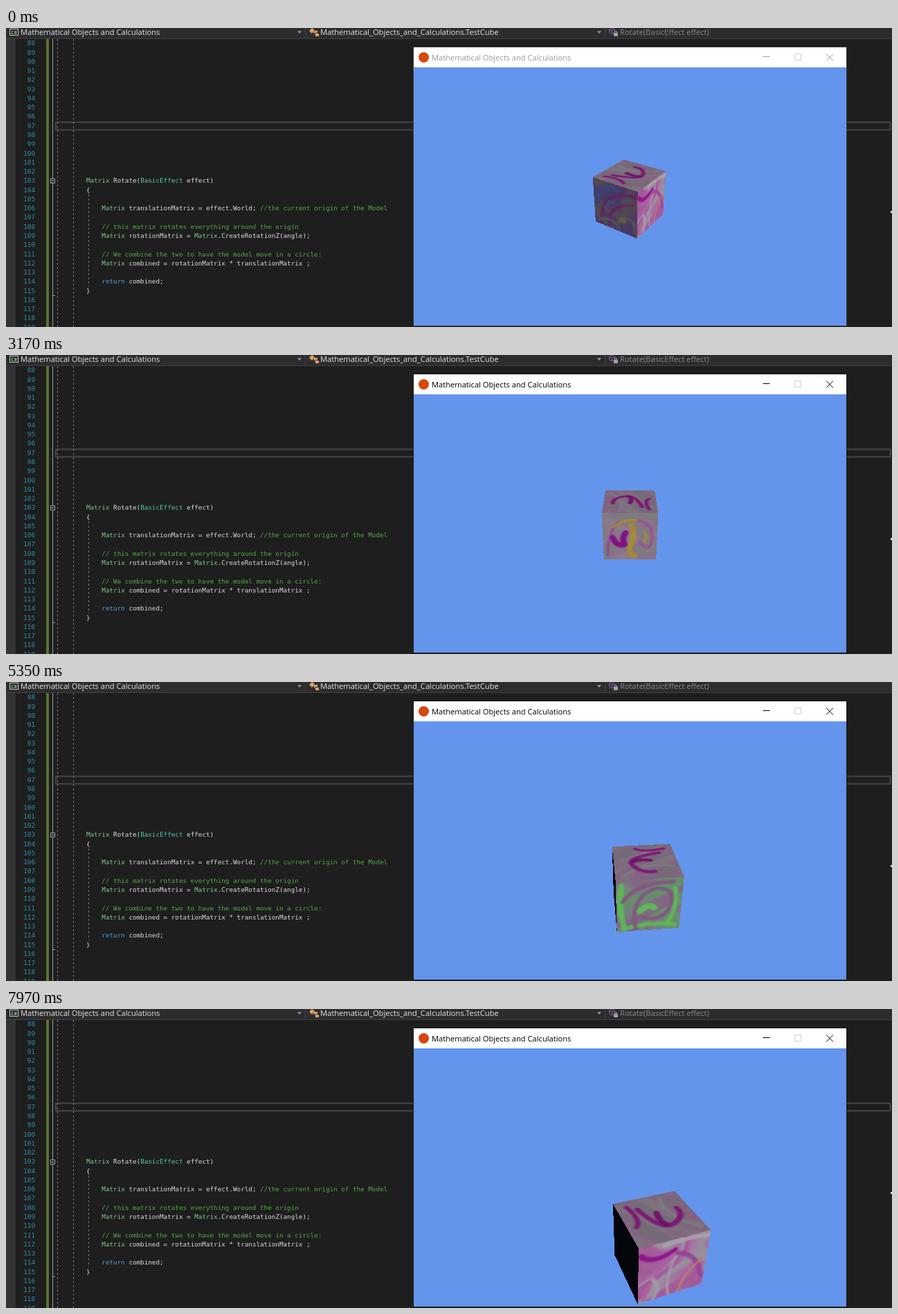
Animation of 1280 by 433 pixels, one loop 8000 ms. Source, as an HTML page with a canvas:

```html
<!DOCTYPE html>
<html lang="en">
<head>
<meta charset="utf-8">
<title>Rotating cube</title>
<style>
  html, body { margin: 0; width: 100%; height: 100%; overflow: hidden; background: #1e1e1e; }
  svg, canvas { position: absolute; display: block; }
  svg { left: 0; top: 0; }
  text { white-space: pre; }
  .ui { font-family: "Open Sans", "Noto Sans", sans-serif; font-size: 11.15px; }
  .code { font-family: "DejaVu Sans Mono", "Noto Sans Mono", monospace; font-size: 9.27px; fill: #dcdcdc; }
</style>
</head>
<body>
<svg width="1280" height="433" viewBox="0 0 1280 433">
  <rect width="1280" height="433" fill="#1e1e1e"/>
  <rect y="15" width="14" height="418" fill="#333335"/>
  <rect width="1280" height="15" fill="#2d2d30"/>
  <path d="M0 15.5H1280M432.5 0V13M865.5 0V13" stroke="#3f3f46"/>

  <g class="ui" fill="#e4e4e4">
    <rect x="5.5" y="1.5" width="12" height="9" fill="#252526" stroke="#c8c8c8"/>
    <text x="7" y="9" font-size="7" font-weight="700" fill="#8cc98c">C#</text>
    <text x="21" y="10">Mathematical Objects and Calculations</text>
    <path d="M421 4.5h6l-3 3.5zM854 4.5h6l-3 3.5z" fill="#999"/>
    <path d="M438 4l4-4 4 3-4 5zM445 4h5v3h-5zM447 8h5v4h-5z" fill="#d9a066"/>
    <path d="M443 5l5 5" stroke="#d9a066"/>
    <text x="454" y="10">Mathematical_Objects_and_Calculations.TestCube</text>
    <path d="M871.5 2.5l4-2.5 4 2.5v4l-4 2.5-4-2.5zl4 2 4-2M875.5 4.5v4" fill="none" stroke="#8a5aa0"/>
    <path d="M878 7h6v5h-6z" fill="#a0a0a0"/>
    <path d="M879.5 7v-2h3v2" fill="none" stroke="#a0a0a0"/>
    <text x="887" y="10" fill="#8a8a8a">Rotate(BasicEffect effect)</text>
  </g>

  <rect x="58" y="16" width="4" height="417" fill="#577430"/>
  <rect x="72" y="136.5" width="1205.5" height="11" fill="none" stroke="#464646" stroke-width="2"/>
  <path d="M67.5 16V433M67.5 387.5H71" stroke="#a0a0a0" fill="none"/>
  <path d="M74.5 16V433M97.5 16V433M119.5 241V374" stroke="#777" stroke-dasharray="3 3"/>
  <rect x="64.5" y="218.5" width="6" height="6" fill="#1e1e1e" stroke="#a0a0a0"/>
  <path d="M66 221.5h3" stroke="#dcdcdc"/>
  <path d="M1279 265v3" stroke="#ddd" stroke-width="2"/>
  <g id="code" class="code"></g>

  <rect id="frame" x="588" y="27" width="627" height="405"/>
  <rect x="589" y="57" width="625" height="374" fill="#6495ed"/>
  <rect x="589" y="28" width="625" height="29" fill="#fff"/>
  <circle cx="603.5" cy="42.5" r="7.5" fill="#d5480c"/>
  <rect x="1139.5" y="37.5" width="9" height="9" fill="none" stroke="#d0d0d0"/>
  <g id="caption">
    <text class="ui" x="615" y="46.5">Mathematical Objects and Calculations</text>
    <path d="M1093.5 41.5h10M1185 37.5l10 10M1195 37.5l-10 10" stroke="currentColor" fill="none"/>
  </g>
</svg>
<canvas id="view" width="190" height="246" style="left:840px;top:185px"></canvas>

<script>
const LOOP = 8000;
const byId = id => document.getElementById(id);
const clamp = (x, a, b) => Math.min(b, Math.max(a, x));

// ---- code listing ----
const PITCH = 13.27, FIRST = 88, CHAR = 5.58;
const listing = {
  103: "Matrix Rotate(BasicEffect effect)",
  104: "{",
  106: "    Matrix translationMatrix = effect.World; //the current origin of the Model",
  108: "    // this matrix rotates everything around the origin",
  109: "    Matrix rotationMatrix = Matrix.CreateRotationZ(angle);",
  111: "    // We combine the two to have the model move in a circle:",
  112: "    Matrix combined = rotationMatrix * translationMatrix ;",
  114: "    return combined;",
  115: "}"
};
const inks = { Matrix: "#86c691", BasicEffect: "#4ec9b0", return: "#569cd6" };

function paint(line) {
  return line.split(/(\/\/.*|\bMatrix\b|BasicEffect|return)/).map(part => {
    const ink = part.startsWith("//") ? "#57a64a" : inks[part];
    return ink ? `<tspan fill="${ink}">${part}</tspan>` : part;
  }).join("");
}

let rows = "";
for (let n = FIRST; n < 120; n++) {
  const y = (25.3 + (n - FIRST) * PITCH).toFixed(2);
  rows += `<text x="42" y="${y}" text-anchor="end" fill="#2b91af">${n}</text>`;
  const line = listing[n];
  if (line) {
    const body = line.trimStart();
    rows += `<text x="${116 + (line.length - body.length) * CHAR}" y="${y}">${paint(body)}</text>`;
  }
}
byId("code").innerHTML = rows;

// ---- marbled faces: noise ramp plus a few soft brush strokes on a 100-unit square ----
const TEX = 128;
const rgb = hex => [1, 3, 5].map(i => parseInt(hex.slice(i, i + 2), 16));

function noise(seed, u, v) {
  let p = u * 2.2 + seed, q = v * 2.2 - seed;
  for (let i = 1; i < 4; i++) {
    p += .8 / i * Math.sin(i * 1.6 * q + seed);
    q += .8 / i * Math.sin(i * 1.4 * p);
  }
  return .5 + .5 * Math.sin(3 * p + 2 * q);
}

function marble(seed, ramp, ...strokes) {
  const [a, b, c] = ramp.split(" ").map(rgb);
  const pen = new OffscreenCanvas(TEX, TEX).getContext("2d", { willReadFrequently: true });
  const img = pen.createImageData(TEX, TEX);
  for (let i = 0; i < TEX * TEX; i++) {
    const n = 2 * noise(seed, i % TEX / TEX, Math.floor(i / TEX) / TEX);
    for (let j = 0; j < 3; j++)
      img.data[4 * i + j] = n < 1 ? a[j] + (b[j] - a[j]) * n : b[j] + (c[j] - b[j]) * (n - 1);
    img.data[4 * i + 3] = 255;
  }
  pen.putImageData(img, 0, 0);
  pen.scale(TEX / 100, TEX / 100);
  pen.lineCap = pen.lineJoin = "round";
  pen.filter = "blur(1.5px)";
  pen.globalAlpha = .9;
  for (const [ink, width, path] of strokes) {
    pen.strokeStyle = ink;
    pen.lineWidth = width;
    pen.stroke(new Path2D(path));
  }
  return pen.getImageData(0, 0, TEX, TEX).data;
}

const faces = [
  marble(1.3, "#7068b0 #98609c #8c8484",
    ["#7070c0", 16, "M8 50Q8 14 45 10"],
    ["#b03c94", 7, "M15 95Q18 20 95 12"],
    ["#b03c94", 5, "M35 95Q35 45 92 30"],
    ["#7f7fd0", 7, "M29 58Q35 38 45 40"],
    ["#98987c", 7, "M55 82Q80 50 95 75"],
    ["#98987c", 6, "M10 92Q40 70 60 95"],
    ["#b0b060", 11, "M66 72h4"]),
  marble(4.1, "#988e94 #a8609a #a0588e",
    ["#8c0c80", 8, "M3 14Q20 34 50 18"],
    ["#a8a4a4", 7, "M35 6Q70 2 98 8"],
    ["#b05a9c", 6, "M50 25Q20 50 8 95"],
    ["#a49aa2", 4, "M52 30Q38 60 45 98"],
    ["#a49aa2", 6, "M20 60Q35 80 22 98"],
    ["#943c88", 7, "M55 25Q85 35 95 80"],
    ["#b88058", 4, "M60 98Q70 60 92 50"]),
  marble(2.6, "#6a9a68 #7c857c #8a6a84",
    ["#60c850", 9, "M8 10Q2 50 12 92"],
    ["#60c850", 8, "M10 95Q50 82 92 92"],
    ["#60c850", 7, "M88 20Q95 60 80 85"],
    ["#88587e", 7, "M10 40Q30 5 85 8"],
    ["#88587e", 6, "M30 95Q20 30 60 18Q95 20 80 60Q65 85 40 72"],
    ["#62cc50", 11, "M36 60Q50 44 58 55"]),
  marble(5.7, "#8a8884 #98788e #988890",
    ["#789078", 5, "M5 8Q50 2 95 10"],
    ["#98509a", 5, "M8 90Q8 40 30 18"],
    ["#a85898", 6, "M65 15Q95 20 90 60Q85 85 70 62"],
    ["#bc9c20", 5, "M20 28Q38 12 60 14"],
    ["#bc9c20", 10, "M52 25Q62 45 50 70Q46 85 60 92"],
    ["#bc9c20", 4, "M76 38Q84 50 76 60"],
    ["#8c0488", 11, "M18 50Q25 72 40 66Q34 52 42 40"]),
  marble(3.4, "#8a8082 #926c88 #80787c",
    ["#8c888a", 6, "M10 30Q50 45 90 8"],
    ["#8a1078", 8, "M25 72Q85 60 70 35Q60 15 40 18"],
    ["#8a1078", 7, "M15 85Q50 75 62 88"],
    ["#7c0a6c", 9, "M42 50Q60 55 70 48"])
];

// ---- ray-cast cube ----
const canvas = byId("view"), ctx = canvas.getContext("2d");
const { width: W, height: H } = canvas;
const RAD = Math.PI / 180;
const FOCAL = 452.7, DIST = 12.41, TILT_S = .5, TILT_C = Math.cos(30 * RAD);
const MID_X = 901.5 - 840, MID_Y = 244.5 - 185;
const AMBIENT = [5, 5, 12];
const texel = x => clamp(Math.floor((x + 1) / 2 * TEX), 0, TEX - 1);

function drawCube(angle, cx, cz) {
  const img = ctx.createImageData(W, H);
  const S = Math.sin(angle * RAD), C = Math.cos(angle * RAD);
  const local = (x, y, z) => [x * C - z * S, y, x * S + z * C];
  const eye = local(-cx, DIST * TILT_S, DIST * TILT_C - cz);
  const light = [0, 90, 180, 270].map(a => Math.sqrt(Math.max(0, Math.cos((angle + a - 40) * RAD))));
  light.push(.86);

  for (let py = 0; py < H; py++) for (let px = 0; px < W; px++) {
    const sx = (px + .5 - MID_X) / FOCAL, sy = (MID_Y - py - .5) / FOCAL;
    const ray = local(sx, sy * TILT_C - TILT_S, -sy * TILT_S - TILT_C);
    let near = -1e9, far = 1e9, axis = 0;
    for (let i = 0; i < 3; i++) {
      const a = (-1 - eye[i]) / ray[i], b = (1 - eye[i]) / ray[i];
      if (Math.min(a, b) > near) { near = Math.min(a, b); axis = i; }
      far = Math.min(far, Math.max(a, b));
    }
    if (near >= far) continue;

    const [x, y, z] = eye.map((e, i) => e + ray[i] * near);
    const id = axis === 1 ? 4 : axis === 2 ? (ray[2] < 0 ? 0 : 2) : (ray[0] < 0 ? 1 : 3);
    const u = [x, -z, -x, z, x][id], v = id === 4 ? z : -y;
    const from = 4 * (texel(v) * TEX + texel(u)), to = 4 * (py * W + px);
    for (let i = 0; i < 3; i++) img.data[to + i] = faces[id][from + i] * light[id] + AMBIENT[i];
    img.data[to + 3] = 255;
  }
  ctx.putImageData(img, 0, 0);
}

// ---- timeline: bursts of steps [first, last, count] ----
const bursts = [
  [1380, 2150, 13], [2200, 2980, 13], [3050, 3830, 13], [3890, 4690, 13], [4770, 5530, 13],
  [5600, 6380, 13], [6440, 7240, 14], [7310, 7450, 3], [7830, 7970, 3]
];
const stepAt = t => bursts.reduce((sum, [a, b, n]) =>
  sum + (t < a ? 0 : Math.min(n, 1 + Math.floor((t - a) / (b - a) * (n - 1) + .3))), 0);
const span = (k, a, b) => clamp(k, a, b) - a;

let shown = -1;
function render(t) {
  const active = t >= 530, ink = active ? "#000" : "#999";
  byId("caption").setAttribute("fill", ink);
  byId("caption").setAttribute("color", ink);
  byId("frame").setAttribute("fill", active ? "#181818" : "#3a3a3a");

  const k = stepAt(t);
  if (k === shown) return;
  shown = k;
  const turn = span(k, 0, 42) + span(k, 52.7, 72.5) + span(k, 78, 95) - span(k, 95, 98);
  const z = .18 * (span(k, 42, 55) + span(k, 74, 82.3));
  drawCube(turn * 4.286 - 34.3, z * .207, z);
}

const start = performance.now();
function tick() {
  render((performance.now() - start) % LOOP);
  requestAnimationFrame(tick);
}
tick();
</script>
</body>
</html>
```
